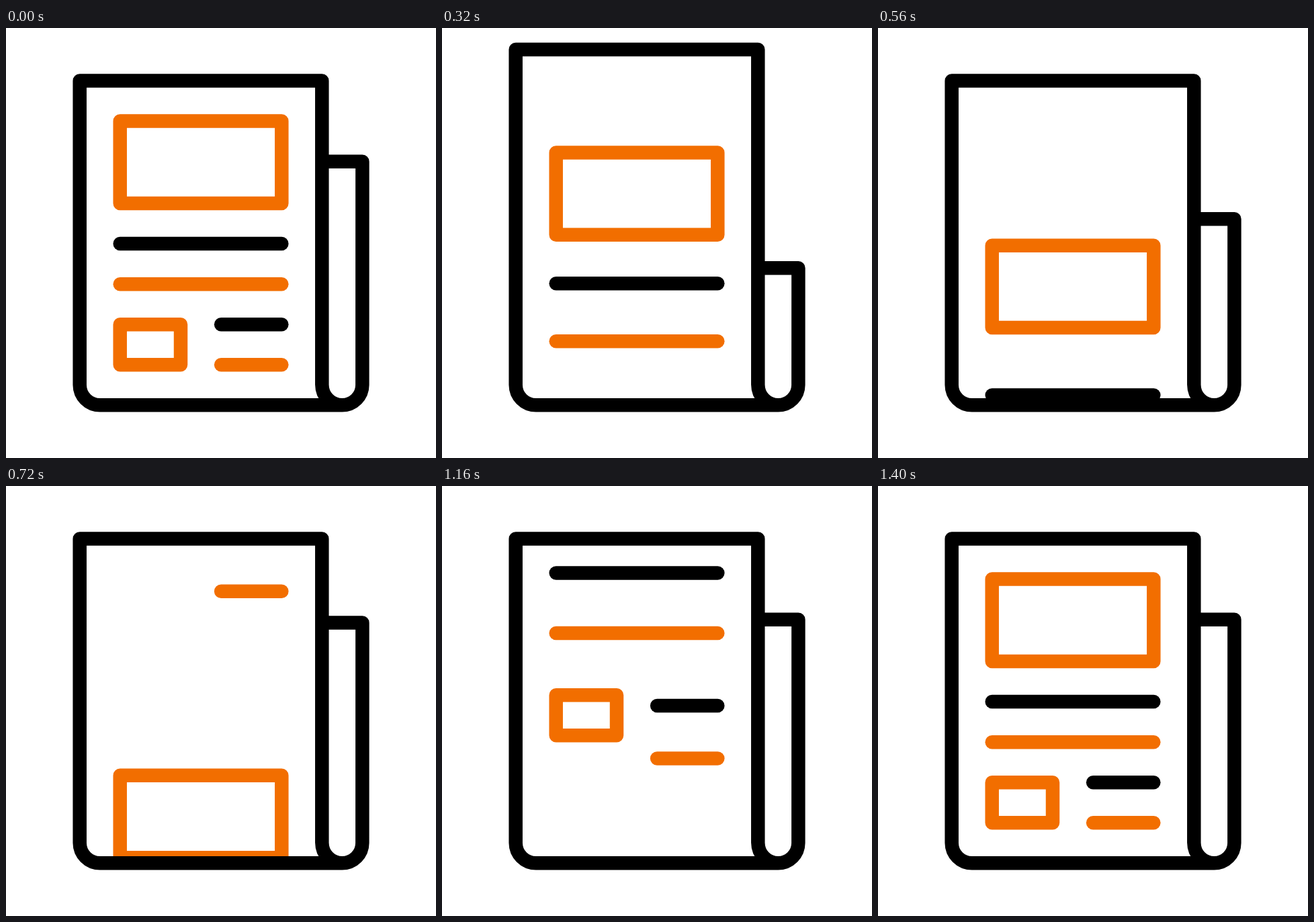
These frames come from a looping animation (640 px wide and 640 px high, 2000 ms). An HTML page with a canvas:

```html
<!DOCTYPE html>
<html lang="en">
<head>
<meta charset="utf-8">
<title>Newspaper</title>
<style>
  html, body { margin: 0; width: 100%; height: 100%; overflow: hidden; background: #fff; }
  canvas { display: block; width: 640px; height: 640px; }
</style>
</head>
<body>
<canvas id="stage" width="640" height="640"></canvas>
<script>
const ctx = document.getElementById('stage').getContext('2d');
const LOOP = 2000, STEP = 40;
const START = 120, END = 1400;
const OUT_DISTANCE = 451, IN_DISTANCE = 462;
const BLACK = '#000', ORANGE = '#f26e00';
const LEFT = 109.7, RIGHT = 470.3, TOP = 78.4, BOTTOM = 561.3, FLAP = 530.4, FLAP_TOP = 198.8;

// leave: time the item finishes dropping out; enter: time it starts dropping in
const items = [
  { color: ORANGE, x1: 169.7, x2: 410.3, y: 138.6, h: 122.3, leave: 1120, enter: 960 },
  { color: BLACK,  x1: 169.7, x2: 410.3, y: 320.9, h: 0,     leave: 1000, enter: 840 },
  { color: ORANGE, x1: 169.7, x2: 410.3, y: 381.2, h: 0,     leave: 840,  enter: 760 },
  { color: ORANGE, x1: 169.7, x2: 260,   y: 441.3, h: 60,    leave: 680,  enter: 640 },
  { color: BLACK,  x1: 320.1, x2: 410.3, y: 441.3, h: 0,     leave: 560,  enter: 560 },
  { color: ORANGE, x1: 320.1, x2: 410.3, y: 501.3, h: 0,     leave: 440,  enter: 440 }
];

// Cubic Bezier easing (k, 0, 1 - k, 1)
function ease(x, k) {
  if (x <= 0) return 0;
  if (x >= 1) return 1;
  let lo = 0, hi = 1;
  for (let i = 0; i < 30; i++) {
    const s = (lo + hi) / 2, r = 1 - s;
    if (3 * k * s * r * r + 3 * (1 - k) * s * s * r + s * s * s < x) lo = s;
    else hi = s;
  }
  return lo * lo * (3 - 2 * lo);
}

const progress = (t, from, to, k = 1 / 3) => ease((t - from) / (to - from), k);

// Rises to 1 at 360 ms, then falls back to 0
const pulse = (t, end) => progress(t, START, 360) - progress(t, 360, end);

function drawItem({ color, x1, x2, y, h }, offset) {
  ctx.strokeStyle = color;
  ctx.beginPath();
  if (h) {
    ctx.rect(x1, y + offset, x2 - x1, h);
  } else {
    ctx.moveTo(x1, y + offset);
    ctx.lineTo(x2, y + offset);
  }
  ctx.stroke();
}

function drawContent(t, top) {
  ctx.save();
  ctx.beginPath();
  ctx.rect(LEFT, top, RIGHT - LEFT, BOTTOM - top);
  ctx.clip();
  for (const item of items) {
    if (t < item.leave) drawItem(item, OUT_DISTANCE * progress(t, START, item.leave));
    if (t > item.enter) drawItem(item, IN_DISTANCE * (progress(t, item.enter, END, 1 / 6) - 1));
  }
  ctx.restore();
}

function drawPaper(top, flapTop) {
  const r = 30, mid = (RIGHT + FLAP) / 2, cy = BOTTOM - r;
  ctx.strokeStyle = BLACK;
  ctx.beginPath();
  ctx.moveTo(mid, BOTTOM);
  ctx.lineTo(LEFT + r, BOTTOM);
  ctx.arc(LEFT + r, cy, r, Math.PI / 2, Math.PI);
  ctx.lineTo(LEFT, top);
  ctx.lineTo(RIGHT, top);
  ctx.lineTo(RIGHT, cy);
  ctx.arc(mid, cy, r, Math.PI, 0, true);
  ctx.lineTo(FLAP, flapTop);
  ctx.lineTo(RIGHT, flapTop);
  ctx.stroke();
}

function draw(t) {
  const top = TOP - 50 * pulse(t, 560);
  ctx.fillStyle = '#fff';
  ctx.fillRect(0, 0, 640, 640);
  ctx.lineWidth = 20.5;
  ctx.lineCap = ctx.lineJoin = 'round';
  drawContent(t, top);
  drawPaper(top, FLAP_TOP + 171 * pulse(t, 760));
}

function tick() {
  const t = performance.now() % LOOP;
  draw(Math.floor(t / STEP) * STEP);
  requestAnimationFrame(tick);
}
tick();
</script>
</body>
</html>
```
